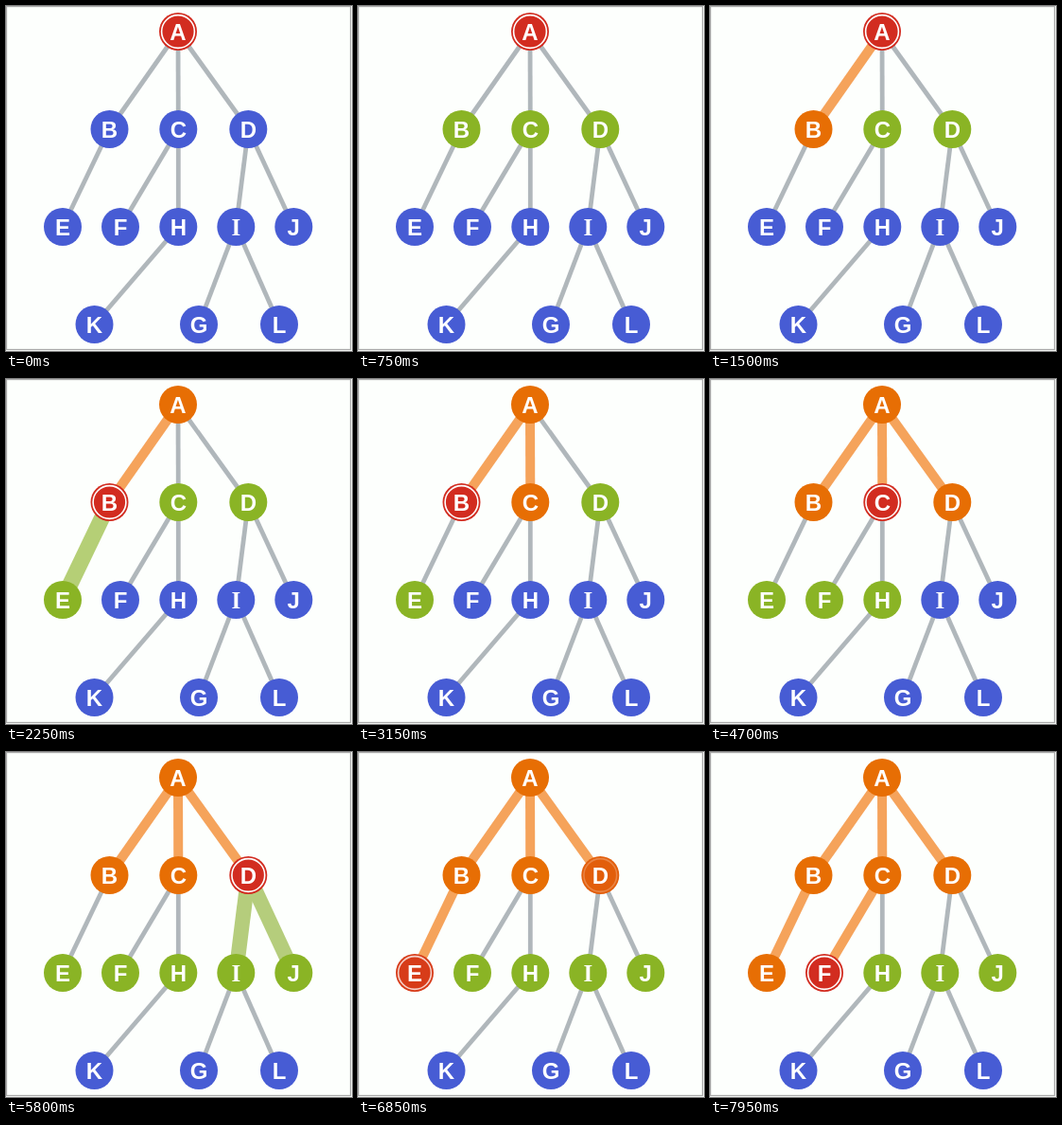
An HTML page that plays this animation: 366x364 px, repeating every 8000 ms.

```html
<!DOCTYPE html>
<html lang="en">
<head>
<meta charset="utf-8">
<title>Breadth-first search</title>
<style>
  html, body { margin: 0; width: 100%; height: 100%; overflow: hidden; background: #fdfffd; }
  svg { display: block; width: 366px; height: 364px; }
  text { font: bold 24px "Liberation Sans", Arial, sans-serif; fill: #fff; text-anchor: middle; }
  .serif { font-family: "Liberation Serif", "Noto Serif", serif; font-size: 25px; }
  .ring { fill: none; stroke: #fff; stroke-width: 1.6; }
  .border { fill: none; stroke: #aaa; stroke-width: 1.3; }
</style>
</head>
<body>
<svg viewBox="0 0 366 364">
  <rect class="border" x=".5" y=".5" width="364" height="362"/>
  <g id="edges"></g>
  <g id="nodes"></g>
</svg>
<script>
const LOOP = 8000, FADE = 100;
const BLUE = [71, 92, 212], GREEN = [138, 180, 37], ORANGE = [231, 110, 4], RED = [210, 44, 32];
const EDGE = [176, 183, 187], EDGE_GREEN = [181, 207, 118], EDGE_ORANGE = [245, 163, 91];

const places = {
  A: [182, 27], B: [109.5, 130], C: [182.3, 130], D: [256.3, 130],
  E: [60, 233], F: [121, 233], H: [182.3, 233], I: [243.3, 233], J: [304.3, 233],
  K: [93.5, 336], G: [204, 336], L: [289, 336]
};
const children = { A: 'BCD', B: 'E', C: 'FH', D: 'IJ', H: 'K', I: 'GL' };

// Visit order with start times; a leaf needs no discovery step.
const visits = [['A', -125], ['B', 1600], ['C', 3325], ['D', 5050], ['E', 6775], ['F', 7550]];
const DISCOVER = 400, DISCOVER_END = 850, PICK = 1150, PICK_LEAF = 300;

const clamp = x => Math.min(1, Math.max(0, x));
const ease = x => (x = clamp(x), x * x * (3 - 2 * x));
const mix = (a, b, k) => a.map((v, i) => v + (b[i] - v) * k);
const css = c => `rgb(${c.map(Math.round)})`;

function add(parent, tag, attrs) {
  const el = document.createElementNS('http://www.w3.org/2000/svg', tag);
  for (const key in attrs) el.setAttribute(key, attrs[key]);
  return parent.appendChild(el);
}

const edges = {}, nodes = {};
for (const [parent, kids] of Object.entries(children)) {
  for (const kid of kids) {
    const [x1, y1] = places[parent], [x2, y2] = places[kid];
    edges[kid] = { line: add(document.getElementById('edges'), 'line', { x1, y1, x2, y2 }) };
  }
}
for (const [name, [cx, cy]] of Object.entries(places)) {
  const group = document.getElementById('nodes');
  const disc = add(group, 'circle', { cx, cy, r: 20 });
  const ring = add(group, 'circle', { cx, cy, r: 17.4, class: 'ring' });
  const label = add(group, 'text', { x: cx, y: cy + 8.5 });
  label.textContent = name;
  if (name === 'I') label.setAttribute('class', 'serif');
  nodes[name] = { disc, ring, changes: [] };
}

visits.forEach(([name, start], i) => {
  const kids = children[name] || '';
  for (const kid of kids) {
    nodes[kid].changes.push([start + DISCOVER, GREEN]);
    edges[kid].found = start + DISCOVER;
  }
  nodes[name].changes.push([start, RED]);
  const next = visits[i + 1];
  if (!next) return;
  const pick = start + (kids ? PICK : PICK_LEAF);
  nodes[next[0]].changes.push([pick, ORANGE]);
  edges[next[0]].picked = pick;
  nodes[name].changes.push([next[1], ORANGE]);
});
for (const node of Object.values(nodes)) node.changes.sort((a, b) => a[0] - b[0]);

function drawNode({ disc, ring, changes }, t) {
  let color = BLUE, glow = 0;
  for (const [at, target] of changes) {
    const k = clamp((t - at) / FADE);
    color = mix(color, target, k);
    glow += ((target === RED) - glow) * k;
  }
  disc.setAttribute('fill', css(color));
  ring.setAttribute('opacity', glow);
}

function drawEdge({ line, found = Infinity, picked = Infinity }, t) {
  const end = found + DISCOVER_END - DISCOVER;
  const pulse = t < found ? 0 : ease((t - found) / 120) * ease((end - t) / 120);
  const chosen = t < picked ? 0 : ease((t - picked) / 150);
  const color = mix(mix(EDGE, EDGE_GREEN, pulse), EDGE_ORANGE, chosen);
  line.setAttribute('stroke', css(color));
  line.setAttribute('stroke-width', 4.8 + 12 * pulse + 5.2 * chosen);
}

function frame(now) {
  const t = (now - began) % LOOP;
  Object.values(edges).forEach(edge => drawEdge(edge, t));
  Object.values(nodes).forEach(node => drawNode(node, t));
  requestAnimationFrame(frame);
}
const began = performance.now();
frame(began);
</script>
</body>
</html>
```
